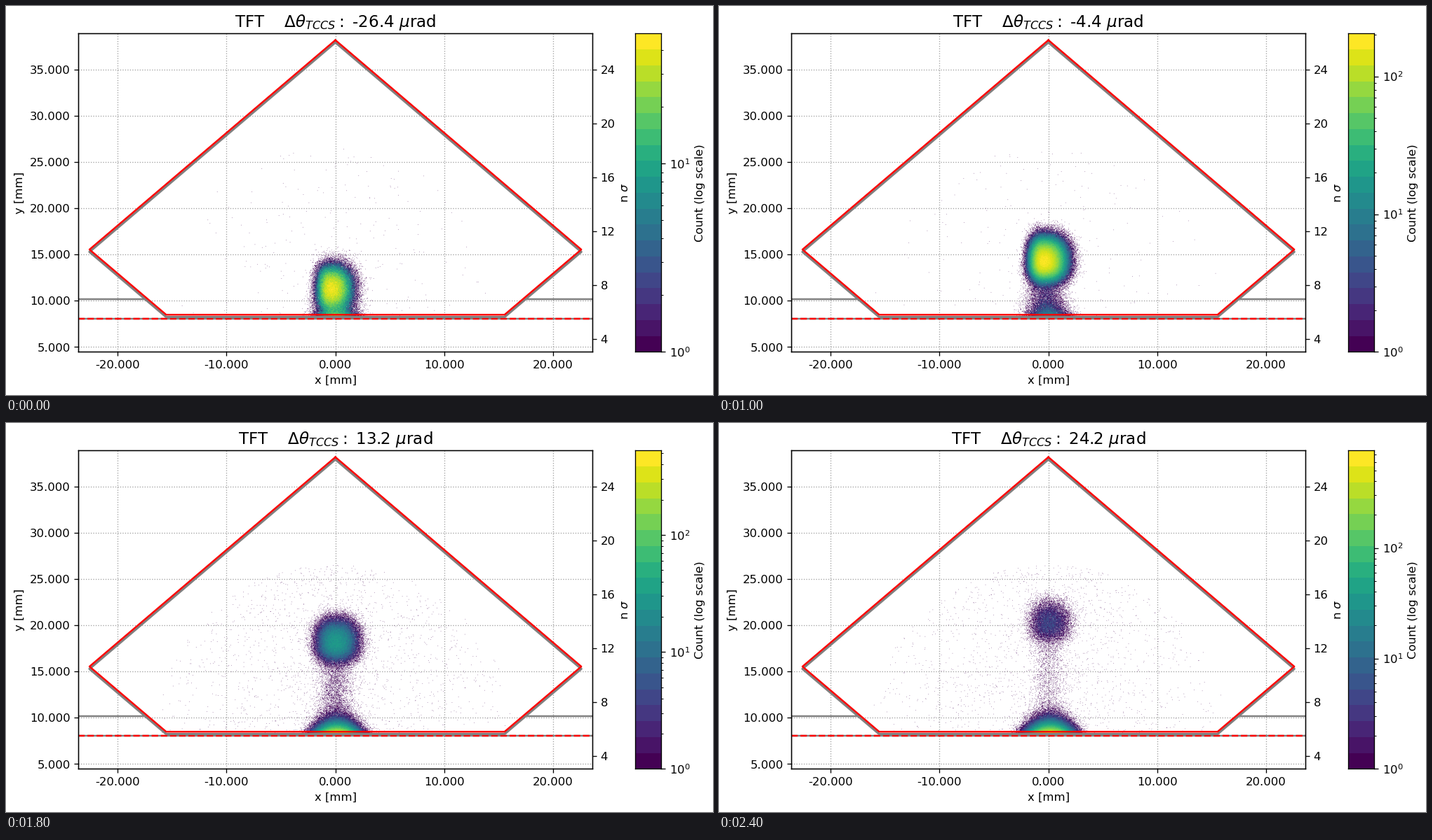
Recreate the animation shown at these times as a matplotlib script. Size 1008 by 556 pixels, loop 2.5 s.

```python
import numpy as np
import matplotlib
import matplotlib.pyplot as plt
from matplotlib.animation import FuncAnimation
from matplotlib.ticker import FormatStrFormatter, MultipleLocator, NullFormatter

W, H, DPI = 1008, 556, 118.5
FRAMES, INTERVAL = 25, 100
LAST = 23              # the final scan step is held for one more frame
XLIM, YLIM = (-23.62, 23.62), (4.47, 38.9)
SIGMA = 1.459          # beam size in mm
FLOOR = 8.28           # lowest y that holds counts
NX, NY = 1200, 740

plt.rcParams.update({"font.family": "DejaVu Sans", "font.size": 10})
CMAP = matplotlib.colormaps["viridis"].resampled(20)


def centres(lim, n):
    edges = np.linspace(*lim, n + 1)
    return (edges[1:] + edges[:-1]) / 2


X = centres(XLIM, NX)
Y = centres(YLIM, NY)
RISE = np.maximum(Y - FLOOR, 0)
ELLIPSE = (X[None] / 16.3) ** 2 + ((Y[:, None] - 8.3) / 18.2) ** 2 < 1
HALO = ELLIPSE * np.exp(-0.5 * (X / 8) ** 2) * (Y > FLOOR)[:, None]
HALO = HALO / HALO.sum()


def top_count(step):
    return 10 ** np.interp(step, [0, 7, 10, 14, 18, LAST],
                           [1.69, 2.12, 2.31, 2.31, 2.72, 2.88])


def bell(v, mid, width):
    return np.exp(-0.5 * ((v - mid) / width) ** 2)


def hump(v, mid, low, high):
    """Flat-topped bell with a different width on each side."""
    d = v - mid
    return np.exp(-0.5 * np.abs(d / np.where(d < 0, low, high)) ** 2.3)


def density(step):
    """Expected counts: a rising core, a dome on the floor, a neck, a halo."""
    vmax = top_count(step)
    turn = 1 / (1 + np.exp(1.8 * (16 - step)))   # core gives way to the dome
    pull = bell(step, 12, 3)                     # core lags mid-scan

    x0 = -0.43 + 0.48 * turn
    y0 = 11.3 + 0.385 * step - 1.2 * pull
    height = 0.85 * vmax * np.exp(-max(step - 14, 0) ** 0.73)
    core = height * np.outer(hump(Y, y0, max(1.34 - 0.04 * step, 1.06), 1.3),
                             hump(X, x0, 0.66 + 0.26 * turn, 1.04))

    height = vmax * (0.45 * np.exp(-0.21 * step) + 0.9 * turn)
    dome = height * np.outer(np.exp(-RISE / (0.46 - 0.09 * turn)),
                             bell(X, 0.15, 0.86))

    height = 1.1 + pull - 0.04 * step
    neck = height * np.outer((Y < y0) * (1 + 3 * np.exp(-RISE / 0.9)),
                             bell(X, x0 / 2, 0.82))

    total = core + dome + neck + (200 + 1400 * turn) * HALO
    total[Y < FLOOR] = 0
    return total


def picture(step):
    counts = np.random.default_rng(100 + step).poisson(density(step))
    hit = counts > 0
    rgba = np.empty((NY, NX, 4))
    rgba[:] = CMAP(0)
    rgba[..., 3] = hit
    rgba[hit] = CMAP(np.log(counts[hit]) / np.log(top_count(step)))
    return rgba


def add_axes(left, right, top=39.5, bottom=494.5):
    return fig.add_axes([left / W, 1 - bottom / H,
                         (right - left) / W, (bottom - top) / H])


fig = plt.figure(figsize=((W + 0.01) / DPI, (H + 0.01) / DPI), dpi=DPI,
                 facecolor="white")

# Main plot
ax = add_axes(103.2, 836)
image = ax.imshow(np.zeros((NY, NX, 4)), extent=(*XLIM, *YLIM), origin="lower",
                  aspect="auto", interpolation="hanning", zorder=1.8)
ax.grid(linestyle=":", color="#a0a0a0")
ax.xaxis.set_major_locator(MultipleLocator(10))
ax.yaxis.set_major_locator(MultipleLocator(5))
for axis in (ax.xaxis, ax.yaxis):
    axis.set_major_formatter(FormatStrFormatter("%.3f"))
ax.set_xlabel("x [mm]")
ax.set_ylabel("y [mm]")

for side in (-1, 1):
    ax.plot([side * 17.4, side * 24], [10.17, 10.17], color="gray", lw=1.5)
ax.axhline(8.03, color="gray", lw=1.5)
ax.axhline(8.03, color="red", ls="--", lw=1.5)

outline_x = np.array([0, 22.6, 15.55, -15.55, -22.6, 0])
outline_y = np.array([38.2, 15.55, 8.5, 8.5, 15.55, 38.2])
ax.plot(outline_x, outline_y - 0.25, color="gray", lw=2)
ax.plot(outline_x, outline_y, color="red", lw=1.5)
ax.set_xlim(XLIM)
ax.set_ylim(YLIM)
title = ax.set_title("", fontsize=14)

# Same height in units of beam size
twin = ax.twinx()
twin.set_ylim(YLIM[0] / SIGMA, YLIM[1] / SIGMA)
twin.yaxis.set_major_locator(MultipleLocator(4))
twin.set_ylabel(r"n $\sigma$")

# Colour scale
bar = add_axes(897.4, 934.4)
bar.set_yscale("log")
bar.pcolormesh([0, 1], np.linspace(0, 1, 21), np.arange(20)[:, None],
               cmap=CMAP, transform=bar.transAxes)
bar.set_xlim(0, 1)
bar.set_xticks([])
bar.yaxis.tick_right()
bar.yaxis.set_label_position("right")
bar.yaxis.set_minor_formatter(NullFormatter())
bar.set_ylabel("Count (log scale)")


def draw(frame):
    step = min(frame, LAST)
    image.set_data(picture(step))
    angle = (step - 12) * 2.2
    title.set_text(rf"TFT    $\Delta\theta_{{TCCS}}:$ {angle:.1f} $\mu$rad")
    bar.set_ylim(1, top_count(step))
    return image, title


anim = FuncAnimation(fig, draw, frames=FRAMES, interval=INTERVAL,
                     repeat=True, blit=False)
plt.show()
```
